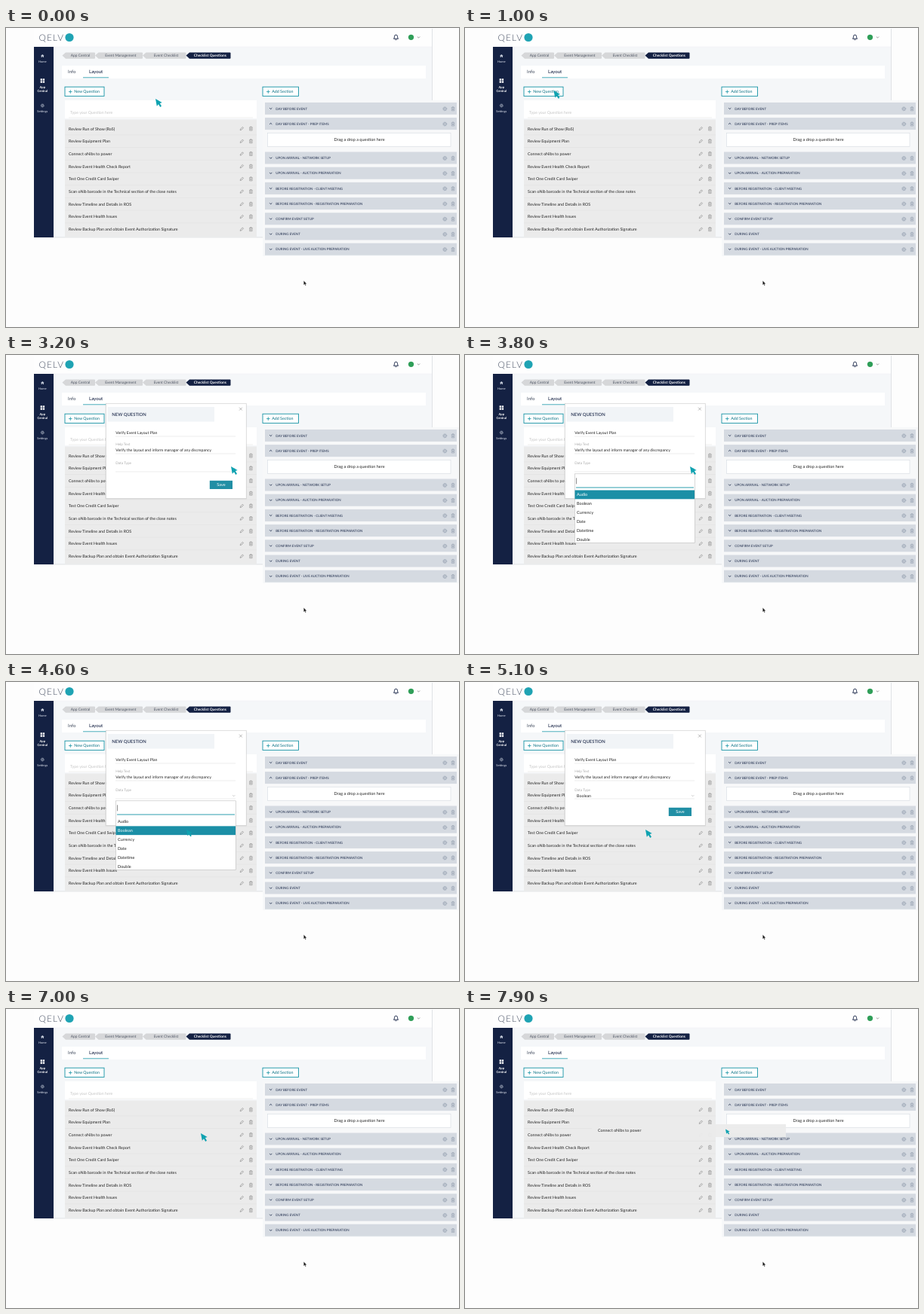
These frames come from a looping animation (600 px wide and 397 px high, 8000 ms). An HTML page:

```html
<!DOCTYPE html>
<html lang="en">
<head>
<meta charset="utf-8">
<title>Checklist builder</title>
<style>
html, body { margin: 0; width: 100%; height: 100%; overflow: hidden; background: #fdfdfd; }
svg { display: block; width: 100vw; height: 100vh; }
text { font-family: Lato, "Open Sans", sans-serif; white-space: pre; }
</style>
</head>
<body>
<svg id="stage" viewBox="0 0 600 397" text-rendering="geometricPrecision"></svg>
<script>
const LOOP = 8000, STEP = 100;
const NAVY = '#142143', TEAL = '#1693a5', INK = '#222', GREY = '#a9a9a9';

// Markup helpers; label() centres capitals on cy.
const rect = (x, y, w, h, fill, extra = '') =>
  `<rect x="${x}" y="${y}" width="${w}" height="${h}" fill="${fill}" ${extra}/>`;
const path = (d, stroke, width = 0.6, extra = '') =>
  `<path d="${d}" fill="none" stroke="${stroke}" stroke-width="${width}" ${extra}/>`;
const hline = (x1, x2, y, stroke, width) => path(`M${x1} ${y}H${x2}`, stroke, width);
const shape = (d, fill, extra = '') => `<path d="${d}" fill="${fill}" ${extra}/>`;
const label = (text, x, cy, size, fill = INK, extra = '') =>
  `<text x="${x}" y="${cy + size * 0.36}" font-size="${size}" fill="${fill}" ${extra}>${text}</text>`;
const group = (content, extra = '') => `<g ${extra}>${content}</g>`;
const at = (x, y, content) => group(content, `transform="translate(${x} ${y})"`);

const MID = 'text-anchor="middle"', BOLD = 'font-weight="700"', MEDIUM = 'font-weight="500"';

const pencil = (x, y) => at(x, y,
  path('M-2.1 2.1L-1.7 .5L1 -2.2L2.2 -1L-.5 1.7Z', '#7d7d7d', 0.6));
const bin = (x, y, color = '#7d7d7d') => at(x, y,
  path('M-2.2 -1.7H2.2M-.8 -1.9V-2.6H.8V-1.9M-1.7 -1.5V2.5H1.7V-1.5M-.5 -.6V1.6M.5 -.6V1.6', color, 0.5));
const gear = (x, y, color, r = 2) => at(x, y,
  `<circle r="${r}" fill="none" stroke="${color}" stroke-width=".5"/>` +
  `<circle r="${r + 0.5}" fill="none" stroke="${color}" stroke-width=".6" stroke-dasharray="1 1"/>` +
  `<circle r="${r * 0.4}" fill="none" stroke="${color}" stroke-width=".4"/>`);
const chevron = (x, y, up, color = NAVY, width = 0.8) => at(x, y,
  path(up ? 'M-1.6 .8L0 -.8L1.6 .8' : 'M-1.6 -.8L0 .8L1.6 -.8', color, width));

const questions = [
  'Review Run of Show (RoS)', 'Review Equipment Plan', 'Connect oNibs to power',
  'Review Event Health Check Report', 'Test One Credit Card Swiper',
  'Scan oNib barcode in the Technical section of the close notes',
  'Review Timeline and Details in ROS', 'Review Event Health Issues',
  'Review Backup Plan and obtain Event Authorization Signature'
];
const sections = [
  'DAY BEFORE EVENT', 'DAY BEFORE EVENT - PREP ITEMS', 'UPON ARRIVAL - NETWORK SETUP',
  'UPON ARRIVAL - AUCTION PREPARATION', 'BEFORE REGISTRATION - CLIENT MEETING',
  'BEFORE REGISTRATION - REGISTRATION PREPARATION', 'CONFIRM EVENT SETUP',
  'DURING EVENT', 'DURING EVENT - LIVE AUCTION PREPARATION'
];
const dataTypes = ['Audio', 'Boolean', 'Currency', 'Date', 'Datetime', 'Double'];

function header() {
  return rect(37, 1, 527, 24, '#fefefe') +
    label('QELV', 43.5, 12.5, 11.8, '#4a5366', 'font-weight="300" letter-spacing="1.2"') +
    '<circle cx="84" cy="12.5" r="5.6" fill="#1fa3b3"/>' +
    at(516.5, 12.3, path('M-3 2H3Q2 1 2 -1A2 2.2 0 0 0 -2 -1Q-2 1 -3 2ZM-.9 3.1Q0 4 .9 3.1', NAVY, 0.9)) +
    '<circle cx="536.5" cy="12.3" r="3.6" fill="#2f9e58"/>' +
    chevron(546.5, 12.3, false, '#555', 0.6);
}

function sidebar() {
  const squares = [[-2.7, -2.7], [0.4, -2.7], [-2.7, 0.4], [0.4, 0.4]]
    .map(([x, y]) => rect(x, y, 2.4, 2.4, '#fff')).join('');
  return rect(37, 25, 26, 253, NAVY) +
    at(48.3, 37, shape('M-2.3 0L0 -2.1L2.3 0H1.6V2.1H.6V.8H-.6V2.1H-1.6V0Z', '#c9d0dd')) +
    label('Home', 48.3, 44.6, 4, '#dfe4ee', MID) +
    at(48.3, 70, squares) +
    label('App', 48.3, 78.2, 4.2, '#fff', `${MID} ${BOLD}`) +
    label('Central', 48.3, 83.3, 4.2, '#fff', `${MID} ${BOLD}`) +
    gear(48.3, 103, '#c9d0dd', 1.6) +
    label('Settings', 48.3, 110.6, 4, '#dfe4ee', MID);
}

// Each crumb points left and has a flat right end.
function breadcrumb() {
  const crumb = (name, x1, x2, fill, ink, weight = '') =>
    shape(`M${x1} 36.6L${x1 + 4.5} 32.6H${x2 - 1}Q${x2} 32.6 ${x2} 33.6V39.7Q${x2} 40.7 ${x2 - 1} 40.7H${x1 + 4.5}Z`, fill) +
    label(name, (x1 + x2 + 4.5) / 2, 36.6, 4.85, ink, `${MID} ${weight}`);
  return crumb('App Central', 74.5, 118, '#d6d7d9', '#4d5563') +
    crumb('Event Management', 118, 181, '#d6d7d9', '#4d5563') +
    crumb('Event Checklist', 181, 238.5, '#d6d7d9', '#4d5563') +
    crumb('Checklist Questions', 238.5, 297.5, NAVY, '#fff', BOLD);
}

const outlined = (text, x, w, textX) =>
  rect(x, 78.2, w, 12.2, '#fff', `stroke="${TEAL}" stroke-width=".9"`) +
  path(`M${textX} 84.6h4.6m-2.3 -2.3v4.6`, TEAL, 0.8) +
  label(text, textX + 7.2, 84.5, 5.3, '#15798b', MEDIUM);

function questionList() {
  const rows = questions.map((text, i) => {
    const y = 133.6 + i * 16.7;
    return label(text, 83, y, 5.35) + pencil(312.3, y) + bin(324.4, y) +
      (i < 8 ? hline(78, 332, y + 8.3, '#dfdfdf', 0.5) : '');
  }).join('');
  return rect(78, 96, 254, 24, '#fff') +
    label('Type your Question here', 85, 112.6, 5.2, '#c3c3c3') +
    hline(83, 327, 119, '#dedede', 0.5) +
    rect(78, 121.5, 254, 156, '#ebebeb') + rows;
}

function sectionPanel() {
  const rows = sections.map((text, i) => {
    const y = i < 2 ? 106.9 + i * 20.2 : 172.5 + (i - 2) * 20.2;
    return rect(343, y - 8, 254, 16, '#d5dae1') +
      chevron(350.7, y, i === 1) +
      label(text, 357.2, y, 4.45, '#2d3a57', MEDIUM) +
      gear(581.3, y + 0.4, '#8490a3') + bin(592, y + 0.4, '#8490a3');
  }).join('');
  return rect(340, 96, 260, 207, '#f7f8f9') + rows +
    rect(346.5, 139.3, 242.5, 18.2, '#fff', 'stroke="#d5dae1" stroke-width=".6"') +
    label('Drag a drop a question here', 468, 148.3, 5.5, '#222', MID);
}

function page() {
  return rect(0, 0, 600, 397, '#fdfdfd') + rect(37, 25, 527, 253, '#f5f7f9') +
    header() + hline(63, 564, 25, '#eceef0', 0.5) +
    path('M564.5 1V278H37', '#d3d6da', 0.7) + sidebar() + breadcrumb() +
    rect(74, 50, 482, 17, '#fff') +
    label('Info', 82, 58.3, 6, '#3c4659') +
    label('Layout', 110, 58.3, 6.1, NAVY, MEDIUM) + hline(102, 136, 65.8, TEAL, 0.8) +
    outlined('New Question', 78, 52, 83) + outlined('Add Section', 340, 47.5, 345) +
    questionList() + sectionPanel() +
    shape('M394.3 335.5V341.3L395.6 340.1L396.5 342.2L397.4 341.8L396.5 339.8H398.3Z',
      '#111', 'stroke="#fff" stroke-width=".3"');
}

const clamp = v => Math.max(0, Math.min(1, v));
const span = (t, a, b) => clamp((t - a) / (b - a));
const smooth = p => p * p * (3 - 2 * p);
const typed = (text, t, a, b) => text.slice(0, Math.round(text.length * span(t, a, b)));

// time, x, y, scale
const pointerKeys = [
  [0, 198, 94, 1], [1200, 111, 82, 1], [2600, 111, 82, 1], [3200, 298, 148, 1],
  [3800, 298, 148, 1], [4400, 239, 196, 1], [4600, 239, 196, 0.85], [5000, 239, 196, 1],
  [5400, 239, 196, 1], [6000, 285, 172, 1], [6100, 285, 172, 0.85], [6400, 285, 172, 1],
  [6900, 258, 165, 1], [7200, 258, 165, 1], [7300, 258, 165, 0.65], [7900, 345, 159.5, 0.65],
  [8000, 345, 159.5, 0.65]
];

function pointerAt(t) {
  const i = Math.max(1, pointerKeys.findIndex(k => k[0] > t));
  const a = pointerKeys[i - 1], b = pointerKeys[i];
  const p = smooth(span(t, a[0], b[0]));
  const [x, y, scale] = [1, 2, 3].map(n => a[n] + (b[n] - a[n]) * p);
  return { x, y, scale };
}

function pointer({ x, y, scale }) {
  return shape('M0 0L8.7 5L5.8 6.1L8 9.8L6.2 10.9L4 7.3L1.8 9.7Z', '#0fa2b0',
    `transform="translate(${x} ${y}) scale(${scale})"`);
}

function modal(t) {
  const open = (1 - (1 - span(t, 1500, 2000)) ** 2) * (1 - smooth(span(t, 6400, 6800)));
  if (open <= 0) return '';
  const scale = 0.82 + 0.18 * open;
  const fields = [108, 131, 155].map(y => hline(145, 304, y, '#d9d9d9', 0.5)).join('');
  const content =
    rect(131.4, 64.6, 187.6, 127, '#000', 'opacity=".07" rx="1"') +
    rect(132.4, 64.5, 185.8, 125.8, '#fff', 'stroke="#cfcfcf" stroke-width=".6"') +
    rect(134.5, 69, 141.5, 19.5, '#f1f4f7') +
    label('NEW QUESTION', 140.3, 78.5, 5.9, NAVY, MEDIUM) +
    path('M309 69.7l3.8 3.8m0 -3.8l-3.8 3.8', '#8a8a8a', 0.6) + fields +
    label(typed('Verify Event Layout Plan', t, 2000, 2500), 145.3, 103.4, 5.15) +
    label('Help Text', 145.3, 118.8, 4.6, GREY) +
    label(typed('Verify the layout and inform manager of any discrepancy', t, 2500, 3100), 145.3, 126.3, 5.15) +
    label('Data Type', 145.3, 143, 4.7, GREY) +
    (t >= 5000 ? label('Boolean', 148, 151.3, 5.3) : '') +
    chevron(301.7, 151, false, '#999', 0.5) +
    rect(269.8, 166.8, 30.2, 11.2, '#218fa5') +
    label('Save', 285, 172.2, 5.5, '#fff', MID);
  return group(content, `opacity="${clamp(open * 1.08)}"
    transform="translate(132 64.5) scale(${scale}) translate(-132 -64.5)"`);
}

function dropdown(t, y) {
  if (t < 3700 || t >= 5000) return '';
  const hovered = Math.max(0, Math.min(5, Math.floor((y - 179.5) / 11.85)));
  const rows = dataTypes.map((name, i) => {
    const cy = 185.4 + i * 11.85, on = i === hovered;
    return (on ? rect(145.5, cy - 5.9, 158.5, 11.8, '#1b8fa6') : '') +
      label(name, 148, cy, 5.5, on ? '#fff' : INK);
  }).join('');
  return rect(145.3, 157.8, 159, 91.5, '#fff', 'stroke="#bdbdbd" stroke-width=".6"') +
    hline(147, 303, 176, TEAL, 0.9) +
    (t % 1000 >= 500 ? path('M147.6 163.3V171.3', '#333', 0.6) : '') + rows;
}

function draggedRow(t, { x, y }) {
  if (t < 7300) return '';
  return at(x - 177, y - 6.5,
    rect(0, 0, 257, 17, '#ececec', 'opacity=".96"') + label(questions[2], 8, 8.3, 5.35));
}

const stage = document.getElementById('stage');
stage.innerHTML = page() + '<g id="live"></g>';
const live = document.getElementById('live');

function draw(t) {
  const p = pointerAt(t);
  live.innerHTML = modal(t) + dropdown(t, p.y) + draggedRow(t, p) + pointer(p);
}

const start = performance.now();
function tick() {
  const t = (performance.now() - start) % LOOP;
  draw(Math.floor(t / STEP) * STEP);
  requestAnimationFrame(tick);
}
tick();
</script>
</body>
</html>
```
